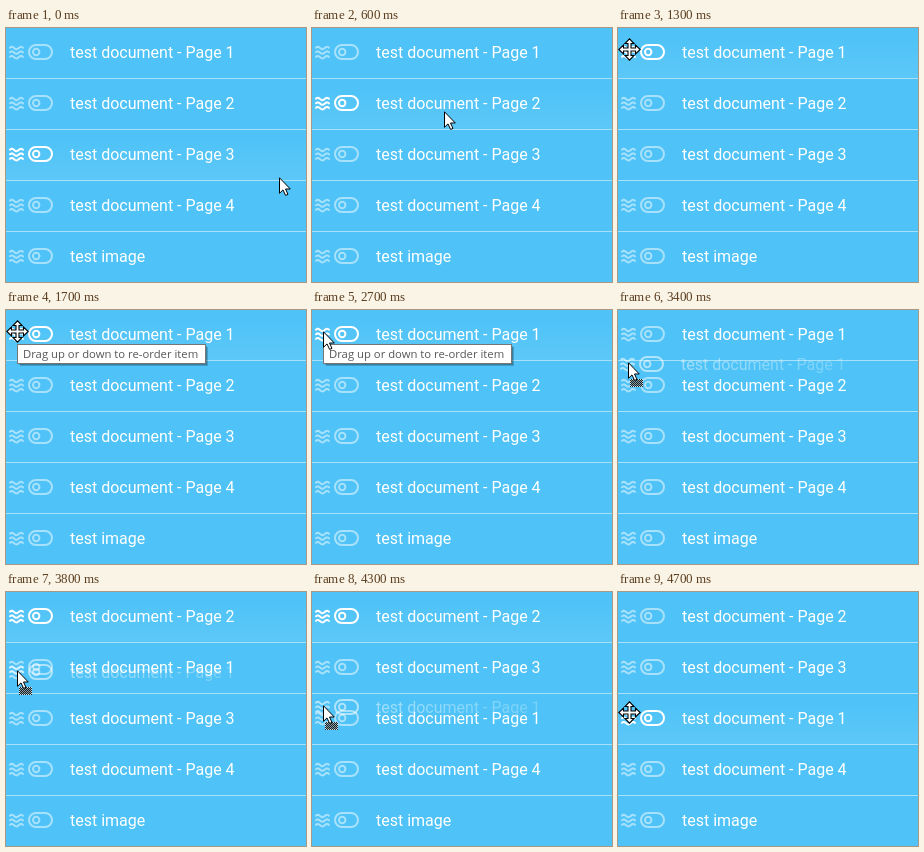
Write an HTML page with a canvas that moves like this. It is 300 px wide and 254 px high and loops after 6700 ms.

```html
<!DOCTYPE html>
<html lang="en">
<head>
<meta charset="utf-8">
<title>Re-order list</title>
<style>
html, body { margin: 0; width: 100%; height: 100%; overflow: hidden; background: #4fc3f7; }
canvas { display: block; }
</style>
</head>
<body>
<canvas id="stage" width="300" height="254"></canvas>
<script>
const ctx = document.getElementById('stage').getContext('2d');
const LOOP = 6700, STEP = 100, ROW = 51, W = 300, H = 254;
const START = ['test document - Page 1', 'test document - Page 2', 'test document - Page 3',
  'test document - Page 4', 'test image'];

// time, x, y of the pointer
const PATH = [
  [0, 273, 149], [700, 108, 72], [1200, 14, 23], [1300, 11, 21], [2700, 11, 21],
  [3300, 10, 48], [3400, 10, 52], [3800, 11, 78], [4000, 11, 97], [4300, 11, 113], [4600, 11, 120]
];
const DRAG_FROM = 2900, DROP = 4500;

function pointerAt(t) {
  let i = 1;
  while (i < PATH.length && PATH[i][0] < t) i++;
  if (i === PATH.length) return PATH[i - 1].slice(1);
  const a = PATH[i - 1], b = PATH[i];
  const k = Math.max(0, (t - a[0]) / (b[0] - a[0]));
  return [1, 2].map(n => Math.round(a[n] + (b[n] - a[n]) * k));
}

function orderAt(t) {
  const list = START.slice();
  const slot = t < 3600 ? 0 : t < 4100 ? 1 : 2;
  list.splice(slot, 0, list.shift());
  return list;
}

function hoverAt(t, y) {
  if (t >= 3400 && t < 3600) return -1;
  if (t >= DRAG_FROM && t < DROP) return 0;
  return Math.floor(y / ROW);
}

function icons() {
  ctx.strokeStyle = '#fff';
  ctx.lineWidth = 2;
  ctx.lineCap = 'round';
  for (let y = 20; y < 31; y += 4.6) {
    ctx.beginPath();
    for (let x = 4; x <= 17; x += 0.5) ctx.lineTo(x, y - 1.2 * Math.sin((x - 3.5) * Math.PI / 4.6));
    ctx.stroke();
  }
  ctx.beginPath();
  ctx.roundRect(23, 17, 23, 14, 7);
  ctx.stroke();
  ctx.beginPath();
  ctx.arc(30.2, 24, 3.2, 0, 7);
  ctx.stroke();
}

function label(text) {
  ctx.fillStyle = '#fff';
  ctx.font = '16px Roboto, sans-serif';
  ctx.fillText(text, 64, 30);
}

function glow() {
  const g = ctx.createLinearGradient(0, 0, 0, 50);
  g.addColorStop(0.2, 'rgba(255,255,255,0)');
  g.addColorStop(1, 'rgba(255,255,255,.08)');
  ctx.fillStyle = g;
  ctx.fillRect(0, 0, W, 50);
}

function row(text, i, hovered) {
  ctx.save();
  ctx.translate(0, i * ROW);
  if (hovered) glow();
  label(text);
  ctx.fillStyle = 'rgba(255,255,255,.5)';
  if (i < 4) ctx.fillRect(0, 50, W, 1);
  ctx.globalAlpha = hovered ? 1 : 0.5;
  icons();
  ctx.restore();
}

// Drag image, fading out towards the right
function ghost(x, y) {
  ctx.save();
  ctx.translate(x - 11, y - 22);
  ctx.globalAlpha = 0.55;
  icons();
  ctx.globalAlpha = 1;
  const g = ctx.createLinearGradient(0, 0, 250, 0);
  g.addColorStop(0, 'rgba(255,255,255,.55)');
  g.addColorStop(1, 'rgba(255,255,255,.2)');
  ctx.fillStyle = g;
  ctx.font = '16px Roboto, sans-serif';
  ctx.fillText(START[0], 64, 30);
  ctx.restore();
}

function shape(points, line) {
  ctx.beginPath();
  for (let i = 0; i < points.length; i += 2) ctx.lineTo(points[i], points[i + 1]);
  ctx.closePath();
  ctx.fillStyle = '#fff';
  ctx.strokeStyle = '#000';
  ctx.lineWidth = line;
  ctx.lineJoin = 'miter';
  ctx.fill();
  ctx.stroke();
}

function arrow(x, y, dragging) {
  ctx.save();
  ctx.translate(x, y);
  if (dragging) {
    for (let j = 0; j < 8; j++) {
      for (let i = 0; i < 13; i++) {
        const edge = j === 0 || j === 7 || i === 0 || i === 12;
        ctx.fillStyle = (i + j) % 2 ? '#222' : edge ? '#cfe6f0' : '#7d99a5';
        ctx.fillRect(2 + i, 17 + j, 1, 1);
      }
    }
  }
  shape([0.5, 0.8, 0.5, 16.3, 4, 12.9, 6.6, 18.4, 9, 17.4, 6.5, 12, 11.3, 12], 1);
  ctx.restore();
}

function moveCursor(x, y) {
  ctx.save();
  ctx.translate(x + 0.5, y + 0.5);
  const arm = [-1.5, -1.5, -1.5, -6, -4.5, -6, 0, -10.7, 4.5, -6, 1.5, -6];
  const points = [];
  for (let q = 0; q < 4; q++) {
    const c = [1, 0, -1, 0][q], s = [0, 1, 0, -1][q];
    for (let i = 0; i < arm.length; i += 2) {
      points.push(arm[i] * c - arm[i + 1] * s, arm[i] * s + arm[i + 1] * c);
    }
  }
  shape(points, 1.1);
  ctx.restore();
}

function tooltip(alpha) {
  ctx.save();
  ctx.globalAlpha = alpha;
  ctx.fillStyle = 'rgba(0,0,0,.2)';
  ctx.fillRect(14, 37, 188, 19);
  ctx.fillRect(13, 36, 188, 19);
  ctx.fillStyle = '#767676';
  ctx.fillRect(11, 34, 189, 20);
  ctx.fillStyle = '#fff';
  ctx.fillRect(12, 35, 187, 18);
  ctx.fillStyle = '#575757';
  ctx.font = '11.3px "Open Sans", sans-serif';
  ctx.fillText('Drag up or down to re-order item', 17, 48);
  ctx.restore();
}

function draw(t) {
  const [x, y] = pointerAt(t);
  const hovered = hoverAt(t, y);
  const dragging = t >= DRAG_FROM && t < DROP;
  ctx.fillStyle = '#4fc3f7';
  ctx.fillRect(0, 0, W, H);
  orderAt(t).forEach((text, i) => row(text, i, i === hovered));
  if (dragging) ghost(x, y);
  if (t >= 1500 && t < 2800) tooltip(Math.min(1, (t - 1400) / 300));
  const onHandle = x < 20 && (t < 2700 || t >= 4600);
  if (onHandle) moveCursor(x, y);
  else arrow(x, y, dragging);
}

const began = performance.now();
function tick() {
  const t = (performance.now() - began) % LOOP;
  draw(Math.floor(t / STEP) * STEP);
  requestAnimationFrame(tick);
}
tick();
</script>
</body>
</html>
```
